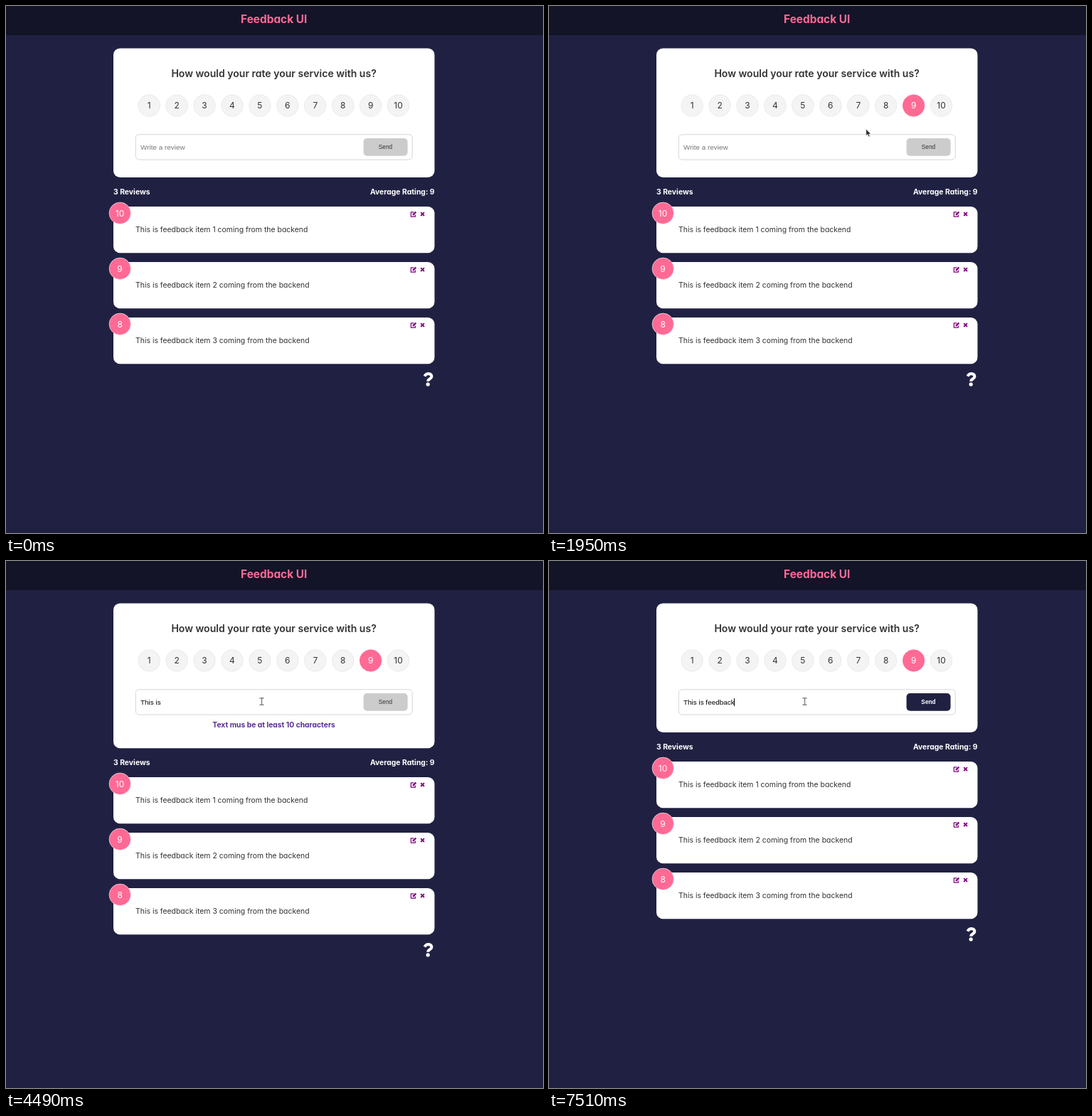
Recreate the animation shown at these times as an HTML page. Size 755 by 741 pixels, loop 8000 ms.

```html
<!DOCTYPE html>
<html lang="en">
<head>
<meta charset="utf-8">
<title>Feedback</title>
<style>
  html, body { margin: 0; width: 100%; height: 100%; overflow: hidden; background: #202142; }
  svg {
    display: block; width: 100vw; height: 100vh; fill: #333;
    font: 10.45px Inter, "Open Sans", sans-serif;
    font-feature-settings: "cv11"; /* single-storey a */
  }
  text { white-space: pre; }
  .mid { text-anchor: middle; }
  .end { text-anchor: end; }
  .bold { font-weight: 700; }
  .panel { fill: #fff; }
  .num { font-size: 12px; text-anchor: middle; }
  .rate circle { fill: #f4f4f4; stroke: #e2e2e2; stroke-width: .62; }
  .rate.on circle { fill: #ff6a95; stroke: #ff6a95; }
  .rate.on text, .badge text { fill: #fff; }
  .badge circle { fill: #ff6a95; stroke: #eee; stroke-width: .7; }
  .field { font: 9.92px "Liberation Sans", Arial, sans-serif; }
  .icon { fill: none; stroke: purple; }
  #button rect { fill: #ccc; }
  #button text { font: 8.3px "Liberation Sans", Arial, sans-serif; }
  #button.ready rect { fill: #202142; }
  #button.ready text { fill: #fff; font-weight: 700; }
</style>
</head>
<body>
<svg viewBox="0 0 755 741" preserveAspectRatio="none">
  <rect width="755" height="41" fill="#131428"/>
  <text class="mid bold" x="376.7" y="24.4" font-size="15.4" fill="#ff6a95">Feedback UI</text>

  <rect id="form" class="panel" x="151" y="59.4" width="451.5" height="181.6" rx="9.3"/>
  <text class="mid" x="376.6" y="100" font-size="14.05" font-weight="600">How would your rate your service with us?</text>
  <g id="rates"></g>

  <rect x="182.3" y="180.7" width="389" height="35.4" rx="5" fill="#fff" stroke="#ccc" stroke-width=".8"/>
  <text id="field" class="field" x="189" y="201.7"></text>
  <rect id="caret" y="193" width="1" height="11" fill="#000"/>
  <g id="button">
    <rect x="502.6" y="186" width="62" height="24.8" rx="5"/>
    <text class="mid" x="533.5" y="201.4">Send</text>
  </g>
  <text id="message" class="mid bold" x="376.6" y="234" font-size="10.3" fill="#5a2d93">Text mus be at least 10 characters</text>

  <g id="lower">
    <g class="bold" fill="#fff" font-size="10.4">
      <text x="151" y="265">3 Reviews</text>
      <text class="end" x="602.6" y="265">Average Rating: 9</text>
    </g>
    <g id="reviews"></g>
    <path d="M588.6 520.6Q590.2 517 593.8 517Q598.4 517.3 598.4 521Q598.3 523 595.6 524.4Q593.3 525.7 593.3 527.8" fill="none" stroke="#fff" stroke-width="4"/>
    <circle cx="593.2" cy="531.9" r="2.6" fill="#fff"/>
  </g>

  <g id="cursor">
    <path id="arrow" d="M0 0V9.4L2.2 7.5L3.8 11L5.4 10.3L3.9 6.9H6.8Z" fill="#2b2b2f" stroke="#fff" stroke-width=".6"/>
    <path id="hand" d="M-1.2.8Q0-.8 1.2.8V5.2Q2.4 4.6 3 5.6Q4.4 5 4.9 6.2Q6.3 5.8 6.4 7.2V10.2L5.4 13.6H-.4L-3.4 9Q-3.8 7.6-2.5 7.6L-1.2 8.8Z" fill="#2f2b30" stroke="#ddd" stroke-width=".5"/>
    <path id="beam" d="M-3-4.8H3M-3 4.8H3M0-4.8V4.8" fill="none" stroke="#858585" stroke-width="1.5"/>
  </g>
</svg>
<script>
const LOOP = 8000;
const FIELD_X = 189;
const $ = id => document.getElementById(id);
const show = (id, on) => $(id).style.display = on ? '' : 'none';
const between = (t, a, b) => t >= a && t < b;

const rateX = n => 201.2 + 38.93 * (n - 1);
const scores = Array.from({ length: 10 }, (_, i) => i + 1);

$('rates').innerHTML = scores.map(n => `
  <g class="rate">
    <circle cx="${rateX(n)}" cy="140" r="15.3"/>
    <text class="num" x="${rateX(n)}" y="144.3">${n}</text>
  </g>`).join('');
const rates = [...$('rates').children];

$('reviews').innerHTML = [10, 9, 8].map((score, i) => `
  <g transform="translate(0 ${282 + 78 * i})">
    <rect class="panel" x="151" width="451.5" height="65.2" rx="9.3"/>
    <text x="182" y="36.3">This is feedback item ${i + 1} coming from the backend</text>
    <g class="badge">
      <circle cx="160.3" cy="9.3" r="15.2"/>
      <text class="num" x="160.1" y="13.7">${score}</text>
    </g>
    <g class="icon">
      <path d="M573.4 7.8H569.4V14.2H575.4V11.6" stroke-width="1.2"/>
      <path d="M572 11.9L576.4 7.5" stroke-width="2.4"/>
      <path d="M583.2 8.2L588 13M588 8.2L583.2 13" stroke-width="1.8"/>
    </g>
  </g>`).join('');

const phrase = 'This is feedback';
const keyTimes = [3070, 3210, 3450, 3530, 3610, 3760, 3860, 3970,
  6080, 6140, 6360, 6690, 7150, 7270, 7430, 7510];
const caretSpans = [[2360, 2860], [3070, 4490], [4990, 5510], [6020, LOOP]];

// time, x, y of the pointer's hot spot
const route = [
  [60, 712, 736], [290, 580, 548], [540, 492, 160], [680, 456, 137],
  [860, 472, 140], [1180, 478.5, 144], [1330, 487, 143], [1470, 507, 142],
  [1630, 513, 143], [1730, 513, 143], [1950, 446, 173], [2350, 359.5, 197.5]
];

function pointerAt(t) {
  const next = route.findIndex(p => p[0] > t);
  if (next < 0) return route.at(-1).slice(1);
  const [a, b] = [route[Math.max(0, next - 1)], route[next]];
  const k = b === a ? 0 : (t - a[0]) / (b[0] - a[0]);
  return [a[1] + (b[1] - a[1]) * k, a[2] + (b[2] - a[2]) * k];
}

function drawPointer(t) {
  const [x, y] = pointerAt(t);
  const hovered = t < 60 ? 0 : scores.find(n => Math.hypot(x - rateX(n), y - 140) < 15.5) || 0;
  const overField = x > 182 && x < 502 && y > 180.5 && y < 216;
  show('cursor', t >= 60);
  show('hand', hovered);
  show('beam', overField);
  show('arrow', !hovered && !overField);
  $('cursor').setAttribute('transform', `translate(${x} ${y})`);
  return hovered;
}

function drawField(t) {
  const typed = phrase.slice(0, keyTimes.filter(k => k <= t).length);
  const field = $('field');
  field.textContent = typed || 'Write a review';
  field.style.fill = typed ? '#000' : '#757575';
  const width = typed ? field.getComputedTextLength() : 0;
  $('caret').setAttribute('x', Math.floor(FIELD_X + width));
  show('caret', caretSpans.some(([a, b]) => between(t, a, b)));
}

function render(t) {
  const hovered = drawPointer(t);
  const selected = t >= 1470 ? 9 : between(t, 1000, 1470) ? 8 : 0;
  rates.forEach((el, i) => el.classList.toggle('on', i + 1 === hovered || i + 1 === selected));

  drawField(t);
  const warning = between(t, 3210, 6690);
  show('message', warning);
  $('form').setAttribute('height', warning ? 203.9 : 181.6);
  $('lower').setAttribute('transform', `translate(0 ${warning ? 22 : 0})`);
  $('button').classList.toggle('ready', t >= 6690);
}

const start = performance.now();
function tick() {
  render((performance.now() - start) % LOOP);
  requestAnimationFrame(tick);
}
tick();
</script>
</body>
</html>
```
